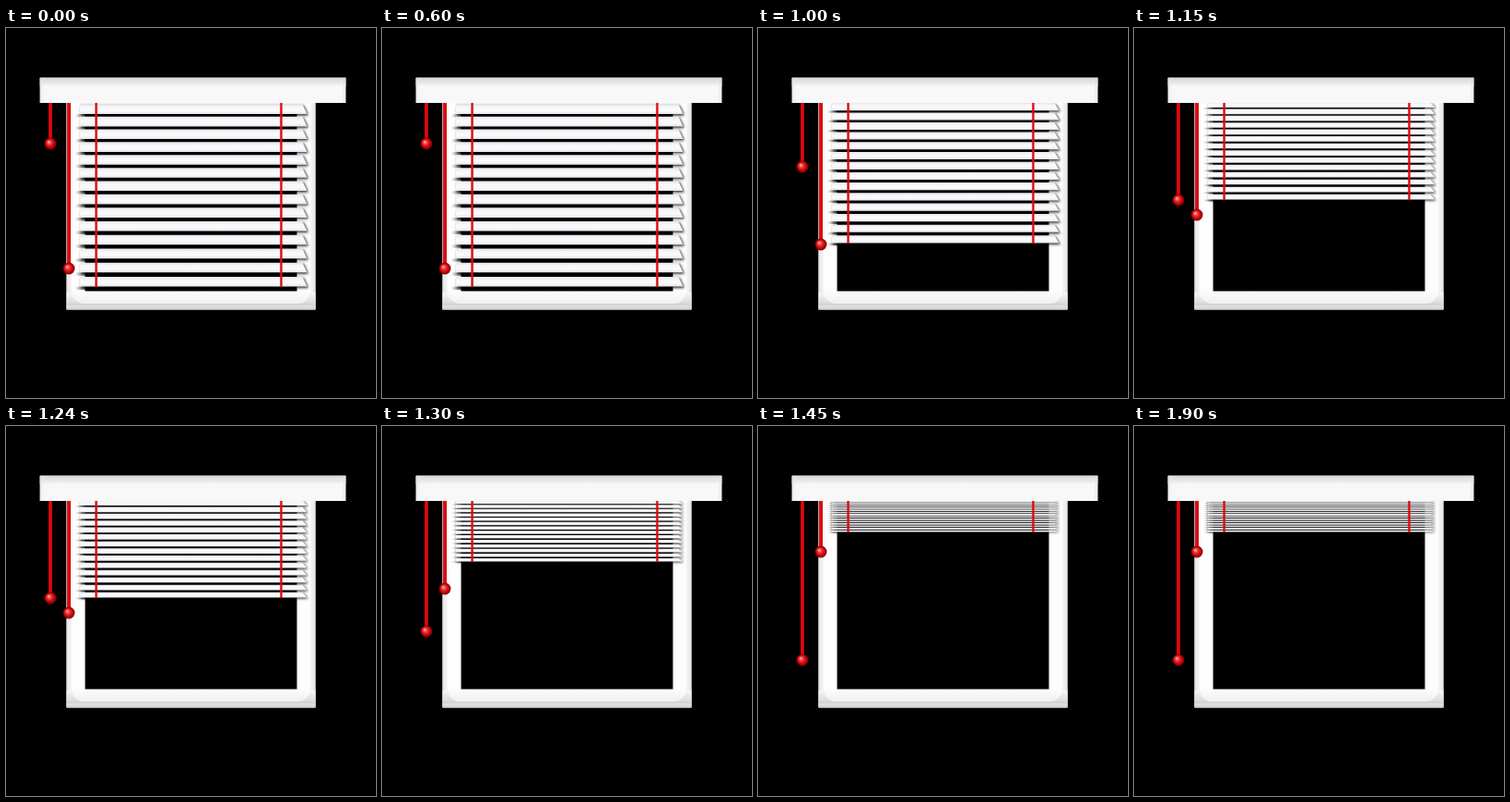
An HTML page with a canvas for the animation above (2200 ms loop, 400x400 px).

```html
<!DOCTYPE html>
<html lang="en">
<head>
<meta charset="utf-8">
<title>Window blind</title>
<style>
html, body { margin: 0; width: 100%; height: 100%; overflow: hidden; background: #000; }
canvas { display: block; }
</style>
</head>
<body>
<canvas id="stage" width="400" height="400"></canvas>
<script>
const ctx = document.getElementById('stage').getContext('2d');
const LOOP = 2200, SLATS = 14, SAG = 0.065;

// Each pose holds until the next start time.
const poses = [
  { start: 0,    first: 93,   last: 279.5, cord: 280, short: 125, long: 260 },
  { start: 1000, first: 89.2, last: 232.5, cord: 233, short: 150, long: 234 },
  { start: 1150, first: 86,   last: 185.5, cord: 186, short: 186, long: 202 },
  { start: 1300, first: 84.3, last: 146.5, cord: 147, short: 222, long: 176 },
  { start: 1450, first: 82.8, last: 114.5, cord: 115, short: 253, long: 136 }
];

function rect(color, x, y, w, h) {
  ctx.fillStyle = color;
  ctx.fillRect(x, y, w, h);
}

function fade(x0, y0, x1, y1, ...colors) {
  const g = ctx.createLinearGradient(x0, y0, x1, y1);
  colors.forEach((c, i) => g.addColorStop(i / (colors.length - 1), c));
  return g;
}

function frame() {
  rect('#f6f6f6', 65.5, 81, 269, 223.5);
  rect(fade(65, 0, 71, 0, '#e2e2e2', '#f6f6f6'), 65.5, 81, 6, 223);
  rect(fade(329, 0, 335, 0, '#f6f6f6', '#e2e2e2'), 328.5, 81, 6, 223);
  rect(fade(0, 286, 0, 298, '#f6f6f6', '#dadada'), 65.5, 286, 269, 12);
  ctx.fillStyle = fade(0, 284, 0, 298, '#fdfdfd', '#f0f0f0');
  ctx.beginPath();
  ctx.roundRect(71, 81, 258, 217, [0, 0, 14, 14]);
  ctx.fill();
  rect(fade(0, 298, 0, 304, '#cecece', '#e2e2e2', '#d0d0d0'), 65.5, 298, 269, 6.5);
  rect('#000', 85.5, 83, 229, 201.5);
}

function slat(bottom, pitch) {
  const height = pitch * 0.74, top = bottom - height;
  const depth = Math.max(1, pitch * 0.24);
  rect(fade(75, 0, 86, 0, 'rgba(0,0,0,0)', 'rgba(0,0,0,.7)'), 75, bottom, 11, depth);
  ctx.save();
  ctx.shadowColor = 'rgba(0,0,0,.85)';
  ctx.shadowBlur = 3;
  ctx.shadowOffsetX = ctx.shadowOffsetY = Math.min(1.4, pitch * 0.14);
  ctx.fillStyle = fade(0, top, 0, bottom, '#e6e6ea', '#f8f8fb', '#fafafc', '#e6e6ea');
  ctx.beginPath();
  ctx.moveTo(80, top);
  ctx.lineTo(320.5, top);
  ctx.lineTo(325.5, bottom);
  ctx.lineTo(80, bottom);
  ctx.fill();
  ctx.restore();
}

function header() {
  rect('#f8f8f8', 36.7, 53.7, 330.6, 27.3);
  rect(fade(0, 54, 0, 63, '#dadada', '#e4e4e4', '#f8f8f8'), 36.7, 53.7, 330.6, 9.3);
  rect(fade(37, 0, 43, 0, 'rgba(222,222,222,.6)', 'rgba(248,248,248,0)'), 36.7, 54, 6.3, 27);
  rect(fade(361, 0, 367, 0, 'rgba(248,248,248,0)', 'rgba(222,222,222,.6)'), 361, 54, 6.3, 27);
}

function pull(x, y) {
  rect(fade(x - 2, 0, x + 2, 0, '#c80000', '#f00808', '#c80000'), x - 1.9, 81, 3.8, y - 81);
  const g = ctx.createRadialGradient(x - 2, y - 2, 0, x, y, 6.4);
  g.addColorStop(0, '#ffc0b8');
  g.addColorStop(0.35, '#e84040');
  g.addColorStop(0.7, '#d00008');
  g.addColorStop(1, '#780000');
  ctx.fillStyle = g;
  ctx.beginPath();
  ctx.arc(x, y, 6.4, 0, Math.PI * 2);
  ctx.fill();
}

function draw(time) {
  const { first, last, cord, short, long } = poses.findLast(p => time >= p.start);
  const span = last - first, pitch = span / (SLATS - 1);
  rect('#000', 0, 0, 400, 400);
  frame();
  // The gaps widen slightly towards the bottom.
  for (let i = 0; i < SLATS; i++) {
    const u = i / (SLATS - 1);
    slat(first + span * (u - SAG * u * (1 - u)), pitch);
  }
  for (const x of [97.5, 297.5]) rect('#e00b0b', x - 1.2, 81, 2.4, cord - 81);
  header();
  pull(48, short);
  pull(68, long);
}

function tick() {
  draw(performance.now() % LOOP);
  requestAnimationFrame(tick);
}
tick();
</script>
</body>
</html>
```
